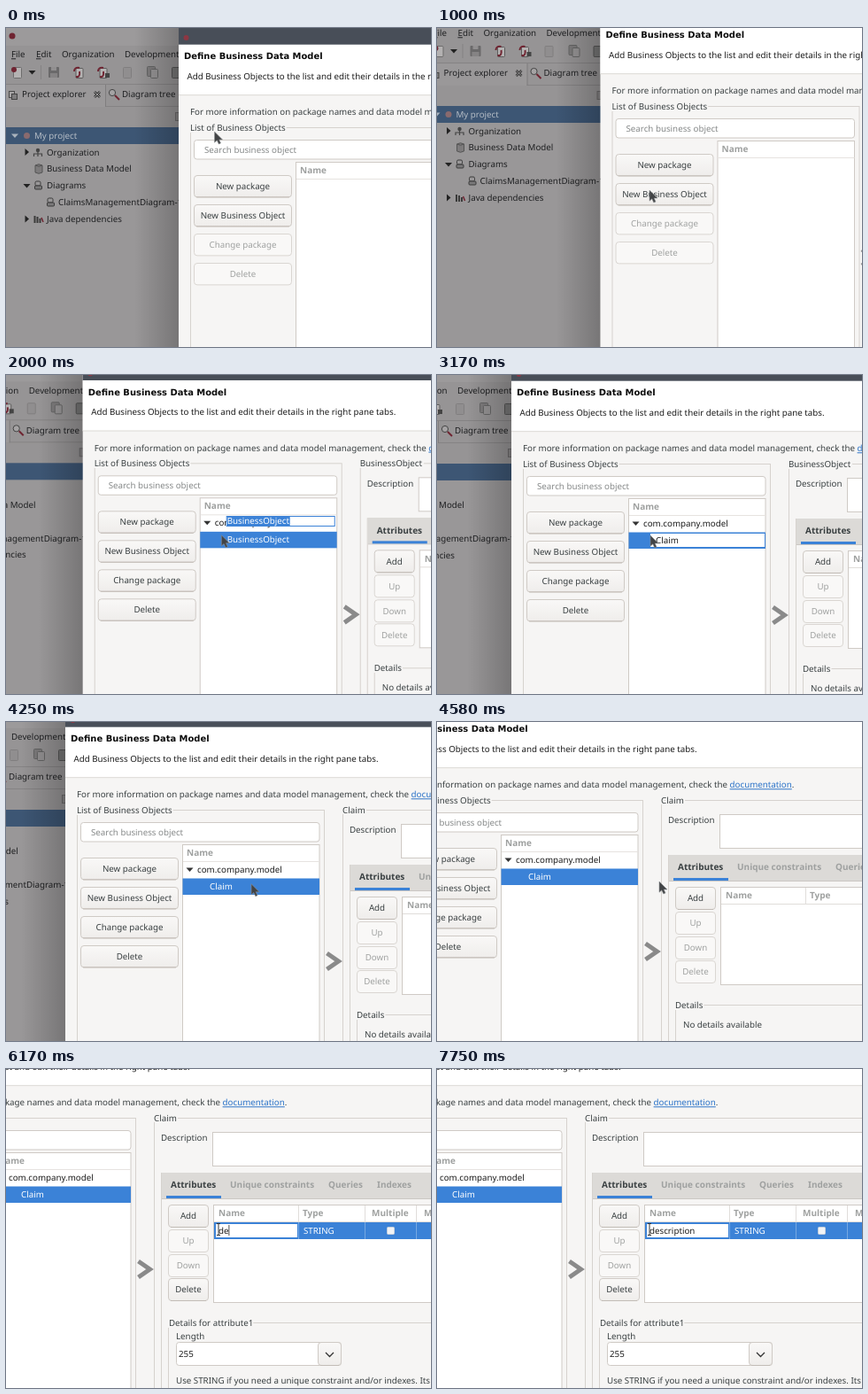
Recreate the animation shown at these times as an HTML page. Size 480 by 360 pixels, loop 8000 ms.

```html
<!DOCTYPE html>
<html lang="en">
<head>
<meta charset="utf-8">
<title>Business data model walkthrough</title>
<style>
  html, body { margin: 0; width: 100%; height: 100%; overflow: hidden; background: #f6f5f4; }
  svg { display: block; width: 100%; height: 100%; }
  text { font: 9.75px "Noto Sans", sans-serif; fill: #3a4042; white-space: pre; text-rendering: geometricPrecision; }
  .title { font: bold 9.95px "DejaVu Sans", sans-serif; fill: #0c0c0c; }
  .bold { font-weight: bold; font-size: 10px; }
  .head { font-weight: bold; font-size: 10px; fill: #9fa1a0; }
  .mid { text-anchor: middle; }
  .off { fill: #a0a2a1; }
  .hint { fill: #868989; }
  .dim { fill: #1f2022; }
  .light { fill: #fff; }
  .dimlight { fill: #b4bcc5; }
  .black { fill: #1c1c1c; }
  .label { paint-order: stroke; stroke: #f6f5f4; stroke-width: 4px; }
  .link { fill: #2a72c8; text-decoration: underline; }
  .key { text-decoration: underline; }
</style>
</head>
<body>
<svg id="stage" viewBox="0 0 480 360" xmlns="http://www.w3.org/2000/svg"></svg>
<script>
const LOOP = 8000, FPS = 12;
const BLUE = '#3b82d7', EDGE = '#cfcac5', BG = '#f6f5f4';
const DIM_BG = '#969495', DIM_RED = '#6f2431';

// Times at which the interface changes
const CREATED = 1250, NAME_CLOSED = 2330, NAME_EDIT = 2670, NAME_DONE = 3500,
      ADDED = 5000, BEAM = 5580;

// [time, x, y] in scene coordinates
const CAMERA = [
  [0, 0, 0], [250, 1, 3], [500, 5, 13], [750, 9, 21], [1000, 10.5, 24], [1170, 14, 26],
  [1330, 32, 26], [1580, 81, 19.7], [1750, 98, 15], [1920, 107, 13], [2170, 111, 12],
  [4170, 111, 12], [4330, 145, 14], [4580, 255, 24], [4750, 289, 34], [5000, 306, 42],
  [5330, 323, 51], [5580, 336, 55], [5830, 341, 57]
];
const POINTER = [
  [0, 235.5, 117], [250, 241, 160], [500, 248, 195], [750, 250, 206], [1000, 250.5, 207],
  [1170, 256, 207], [1420, 315, 203], [1580, 344.5, 199.5], [1750, 351, 194], [2170, 352, 193],
  [4080, 352, 193], [4330, 430, 197], [4580, 506, 204], [4750, 543, 219], [5000, 549, 223],
  [5330, 577, 234], [5580, 581, 238]
];
// [time, text]
const NAME_TYPING = [[2830, 'C'], [3000, 'Cl'], [3080, 'Clai'], [3170, 'Claim']];
const ATTR_TYPING = [
  [5920, 'd'], [6080, 'de'], [6250, 'des'], [6330, 'desc'], [6500, 'descr'], [6580, 'descri'],
  [6670, 'descrip'], [6920, 'descript'], [7080, 'descriptio'], [7250, 'description']
];

const rect = (x, y, w, h, fill, stroke = 'none', r = 0) =>
  `<rect x="${x}" y="${y}" width="${w}" height="${h}" rx="${r}" fill="${fill}" stroke="${stroke}"/>`;
const path = (d, stroke, width = 1, fill = 'none') =>
  `<path d="${d}" fill="${fill}" stroke="${stroke}" stroke-width="${width}"/>`;
const dot = (x, y, r, fill) => `<circle cx="${x}" cy="${y}" r="${r}" fill="${fill}"/>`;
// Text placed by its vertical centre
const text = (x, y, s, cls = '') => `<text x="${x}" y="${y + 3.3}" class="${cls}">${s}</text>`;
const when = (from, to, body) => `<g data-from="${from}" data-to="${to}">${body}</g>`;
const until = (to, body) => when(-1, to, body);
const since = (from, body) => when(from, LOOP, body);

const button = (x, y, w, h, s, on = true) =>
  rect(x + .5, y + .5, w - 1, h - 1, on ? 'url(#btn)' : '#f9f8f7', on ? EDGE : '#dad6d2', 3.5) +
  (on ? path(`M${x + 3} ${y + h - .5}h${w - 6}`, '#c2bcb6') : '') +
  text(x + w / 2, y + h / 2, s, on ? 'mid' : 'mid off');
const wideButton = (y, s, on) => button(212, y, 111, 25.4, s, on);
const field = (x, y, w, h, r = 0) => rect(x + .5, y + .5, w - 1, h - 1, '#fff', EDGE, r);
const editor = (x, y, w, h) => rect(x + .5, y + .5, w - 1, h - 1, '#fff', BLUE);
const frame = (x, y, w, h) => rect(x + .5, y + .5, w, h, 'none', '#d6d2ce');
const openMark = (x, y, c) => path(`M${x - 4} ${y - 2}h8l-4 4.5z`, 'none', 0, c);
const shutMark = (x, y, c) => path(`M${x - 2} ${y - 4}v8l4.5-4z`, 'none', 0, c);

function toolbar() {
  const page = x => rect(x - 3, 45.5, 8, 11, '#b4b2b2', '#5d5c5c', 1) +
    path(`M${x - 5} 49q0-5 6-4M${x - 3} 55q5 1 4-6`, DIM_RED, 2);
  return rect(8.5, 44.5, 9, 12, '#b4b2b2', '#6d6c6c', 1) + dot(9, 47, 3, DIM_RED) +
    openMark(29.5, 50, '#222') + path('M39.5 42v16', '#848283') +
    rect(48, 44, 12, 12, '#6a696a', 'none', 1) + rect(51, 44, 6, 4, '#918f90') + rect(50, 51, 8, 5, '#858384') +
    page(82) + page(109) + rect(112, 51, 5, 5, '#444') +
    rect(132.5, 44.5, 9, 12, '#908e8f', '#807e7f', 1) +
    rect(159.5, 43.5, 9, 11, '#7e7c7d', '#666', 1) + rect(163.5, 46.5, 8, 10, '#969495', '#666', 1) +
    rect(187.5, 44.5, 10, 12, '#777', '#555', 1);
}

function person(x, y) {
  return dot(x, y - 3, 2.2, '#444') + path(`M${x - 4.5} ${y + 4}v-3h9v3M${x} ${y - 1}v5`, '#444', 1.2);
}

function diagramIcon(x, y) {
  return rect(x - 3, y - 5, 6, 5, 'none', '#3a3a3a', 1.5) + rect(x - 3.5, y, 8, 4, '#7a797a', '#3a3a3a', 1);
}

function mainWindow() {
  const ink = '#222';
  return rect(0, 0, 200, 420, DIM_BG) + rect(0, 0, 200, 20, '#9c9a9b') +
    dot(7, 9, 3.5, DIM_RED) +
    text(6, 30, '<tspan class="key">F</tspan>ile', 'dim') +
    text(34, 30, '<tspan class="key">E</tspan>dit', 'dim') +
    text(63, 30, 'Organization', 'dim') + text(134, 30, 'Development', 'dim') +
    toolbar() +
    path('M0 63.5H200M0 88.5H200', '#858384') + rect(0, 64, 112, 25, '#9a9899') +
    path('M112.5 64v25', '#7f7d7e') +
    rect(3.5, 71.5, 6, 7, '#a5a3a4', '#4b4b4b') + rect(6.5, 74.5, 6, 6, '#7d7c7d', '#444') +
    text(18, 75, 'Project explorer', 'dim') +
    path('M100 72l6 6M106 72l-6 6', '#333', 2.6) + path('M100 72l6 6M106 72l-6 6', '#9a9899', 1) +
    path('M123 76l5 5', DIM_RED, 2) + `<circle cx="120" cy="73" r="3.6" fill="#a5a3a4" stroke="#444"/>` +
    text(131, 75, 'Diagram tree', 'dim') +
    rect(191.5, 95.5, 8, 9, '#878586', '#6c6a6b') +
    rect(0, 112, 200, 310, '#999798') + rect(0, 112, 200, 19, '#3d5674') +
    openMark(10, 121.5, '#a9b2bc') + dot(23.5, 121.5, 3.5, '#8a6a6e') + text(32, 121.5, 'My project', 'dimlight') +
    shutMark(23.5, 140, ink) + person(36, 141) + text(46, 140.5, 'Organization', 'dim') +
    path('M33 155v8q4 2.5 8 0v-8q-4-2.5-8 0q4 2.5 8 0', '#555', 1, '#7d7b7c') + text(46, 159, 'Business Data Model', 'dim') +
    openMark(23.5, 178, ink) + diagramIcon(36, 178) + text(46, 178, 'Diagrams', 'dim') +
    diagramIcon(50, 197) + text(59, 197, 'ClaimsManagementDiagram-1.0', 'dim') +
    shutMark(23.5, 215.5, ink) + path('M32.5 212v8M35.5 213v7M38.5 215v5', '#3a3a3a', 2) + path('M40 214l2 5', DIM_RED, 1.5) +
    text(46, 215.5, 'Java dependencies', 'dim') +
    rect(145, 0, 50, 420, 'url(#shade)');
}

function objectList() {
  return frame(208, 112, 279, 320) + text(208, 112.5, 'List of Business Objects', 'label') +
    field(212, 126, 270.5, 22.5, 3) + text(224, 137.3, 'Search business object', 'hint') +
    wideButton(166, 'New package') + wideButton(199, 'New Business Object') +
    until(CREATED, wideButton(232, 'Change package', false) + wideButton(265, 'Delete', false)) +
    since(CREATED, wideButton(232, 'Change package') + wideButton(265, 'Delete')) +
    field(327, 151, 155.5, 290) + path('M328 170.5h154', '#e6e3e0') + text(332, 160.5, 'Name', 'head') +
    since(CREATED,
      openMark(335.5, 179.5, '#333') + text(344, 179.8, 'com.company.model', 'black') +
      rect(327.5, 189.5, 154.5, 18.5, BLUE) +
      until(NAME_DONE, text(358, 198.5, 'BusinessObject', 'light')) +
      since(NAME_DONE, text(358, 198.5, 'Claim', 'light')) +
      until(NAME_CLOSED, editor(357, 171.7, 123, 12) + rect(358, 172.7, 71, 10, BLUE) + text(358, 177.7, 'BusinessObject', 'light')) +
      when(NAME_EDIT, NAME_DONE, editor(351, 190, 131, 17) +
        until(NAME_TYPING[0][0], rect(357, 192, 72, 13, BLUE) + text(358, 198.7, 'BusinessObject', 'light')) +
        `<text id="name" x="358" y="202.3" class="black"></text>`)) +
    path('M490.5 274l13 9-13 9', '#8a8a8a', 5);
}

function attributeTable() {
  return field(575, 210, 300, 111) + path('M576 229.5h290M671.5 211v18M746.5 211v18M804.5 211v18', '#e0ddda') +
    text(581, 220, 'Name', 'head') + text(676, 220, 'Type', 'head') +
    text(754, 220, 'Multiple', 'head') + text(813, 220, 'Mandatory', 'head') +
    since(ADDED,
      rect(576, 230, 290, 19, BLUE) + path('M671.5 230v19M746.5 230v19M804.5 230v19', '#76a8e2') +
      text(677, 239.5, 'STRING', 'light') + rect(771.5, 235.5, 8, 8, '#f1f3f6', '#c3cedb', 1) +
      editor(577, 231, 94, 17) +
      until(ATTR_TYPING[0][0], rect(580, 233, 48, 13, BLUE) + text(581, 239.8, 'attribute1', 'light')) +
      `<text id="attr" x="581" y="243.3" class="black"></text>` +
      `<rect id="caret" y="233" width=".8" height="12" fill="#222"/>`);
}

function details() {
  return frame(524, 343, 330, 100) +
    until(ADDED, text(524, 343.3, 'Details', 'label') + text(533, 365.5, 'No details available')) +
    since(ADDED,
      text(525, 343.3, 'Details for attribute1', 'label') + text(533, 358.3, 'Length') +
      field(533, 365, 187, 27, 3) + button(693, 365, 27, 27, '') + path('M702 377l4.5 4.5 4.5-4.5', '#333', 1.3) +
      text(536, 379, '255', 'black') +
      text(533, 408.5, 'Use STRING if you need a unique constraint and/or indexes. Its'));
}

function objectEditor() {
  return since(CREATED,
    frame(508, 112, 350, 320) +
    until(NAME_DONE, text(508, 112.5, 'BusinessObject', 'label')) +
    since(NAME_DONE, text(508, 112.5, 'Claim', 'label')) +
    text(516, 135, 'Description') + field(574, 128, 300, 39) +
    frame(516, 174, 340, 260) + rect(517, 174, 340, 29, '#dcdad7') + path('M517 203.5h340', '#cbc7c3') +
    rect(522, 200, 62, 3, BLUE) + text(527, 188, 'Attributes', 'bold') +
    text(594, 188, 'Unique constraints', 'head') + text(705, 188, 'Queries', 'head') + text(760, 188, 'Indexes', 'head') +
    button(524, 210, 46, 26, 'Add') + button(524, 238, 46, 26, 'Up', false) + button(524, 266, 46, 26, 'Down', false) +
    until(ADDED, button(524, 293, 46, 26, 'Delete', false)) + since(ADDED, button(524, 293, 46, 26, 'Delete')) +
    attributeTable() + details());
}

function dialog() {
  return rect(195, 0, 700, 440, BG) + rect(195, 0, 700, 19, '#484e58') + dot(203.5, 11, 3, '#8d3743') +
    rect(195, 18.7, 700, 57, '#fff') + path('M195 75.7h700', '#dcd9d6') +
    text(201, 32, 'Define Business Data Model', 'title') +
    text(204.5, 54.2, 'Add Business Objects to the list and edit their details in the right pane tabs.', 'black') +
    text(208, 95, 'For more information on package names and data model management, check the <tspan class="link">documentation</tspan>.') +
    objectList() + objectEditor();
}

const stage = document.getElementById('stage');
stage.innerHTML = `
  <defs>
    <linearGradient id="btn" x2="0" y2="1"><stop stop-color="#f9f8f7"/><stop offset="1" stop-color="#efedeb"/></linearGradient>
    <linearGradient id="shade"><stop stop-opacity="0"/><stop offset="1" stop-opacity=".22"/></linearGradient>
  </defs>
  <g id="scene">${mainWindow()}${dialog()}
    <g id="pointer">
      ${until(BEAM, path('M0 0V12.2L2.8 9.8 4.8 14 7 13 5.2 9H9z', '#8f9294', .6, '#424446'))}
      ${since(BEAM, path('M-2-6.5H2M0-6.5V6.5M-2 6.5H2', '#333', 1))}
    </g>
  </g>`;

const [scene, pointer, nameText, attrText, caret] =
  ['scene', 'pointer', 'name', 'attr', 'caret'].map(id => document.getElementById(id));
const timed = [...stage.querySelectorAll('[data-from]')];

function along(keys, t) {
  const i = keys.findIndex(k => k[0] > t);
  if (i < 0) return keys[keys.length - 1].slice(1);
  const [t0, x0, y0] = keys[i - 1], [t1, x1, y1] = keys[i];
  const p = (t - t0) / (t1 - t0);
  return [x0 + (x1 - x0) * p, y0 + (y1 - y0) * p];
}

const typed = (steps, t) => steps.reduce((s, [at, str]) => t >= at ? str : s, '');

function draw(time) {
  const t = Math.round(Math.floor((time + 5) * FPS / 1000) * 100 / FPS) * 10 % LOOP;
  const [cx, cy] = along(CAMERA, t), [px, py] = along(POINTER, t);
  scene.setAttribute('transform', `translate(${-cx} ${-cy})`);
  pointer.setAttribute('transform', `translate(${px} ${py})`);
  for (const el of timed)
    el.style.display = t >= +el.dataset.from && t < +el.dataset.to ? '' : 'none';
  nameText.textContent = typed(NAME_TYPING, t);
  attrText.textContent = typed(ATTR_TYPING, t);
  const caretOn = t >= ATTR_TYPING[0][0] && t < 7750;
  caret.style.display = caretOn ? '' : 'none';
  if (caretOn) caret.setAttribute('x', 581 + attrText.getComputedTextLength());
}

const start = performance.now();
function tick() {
  draw((performance.now() - start) % LOOP);
  requestAnimationFrame(tick);
}
tick();
</script>
</body>
</html>
```
